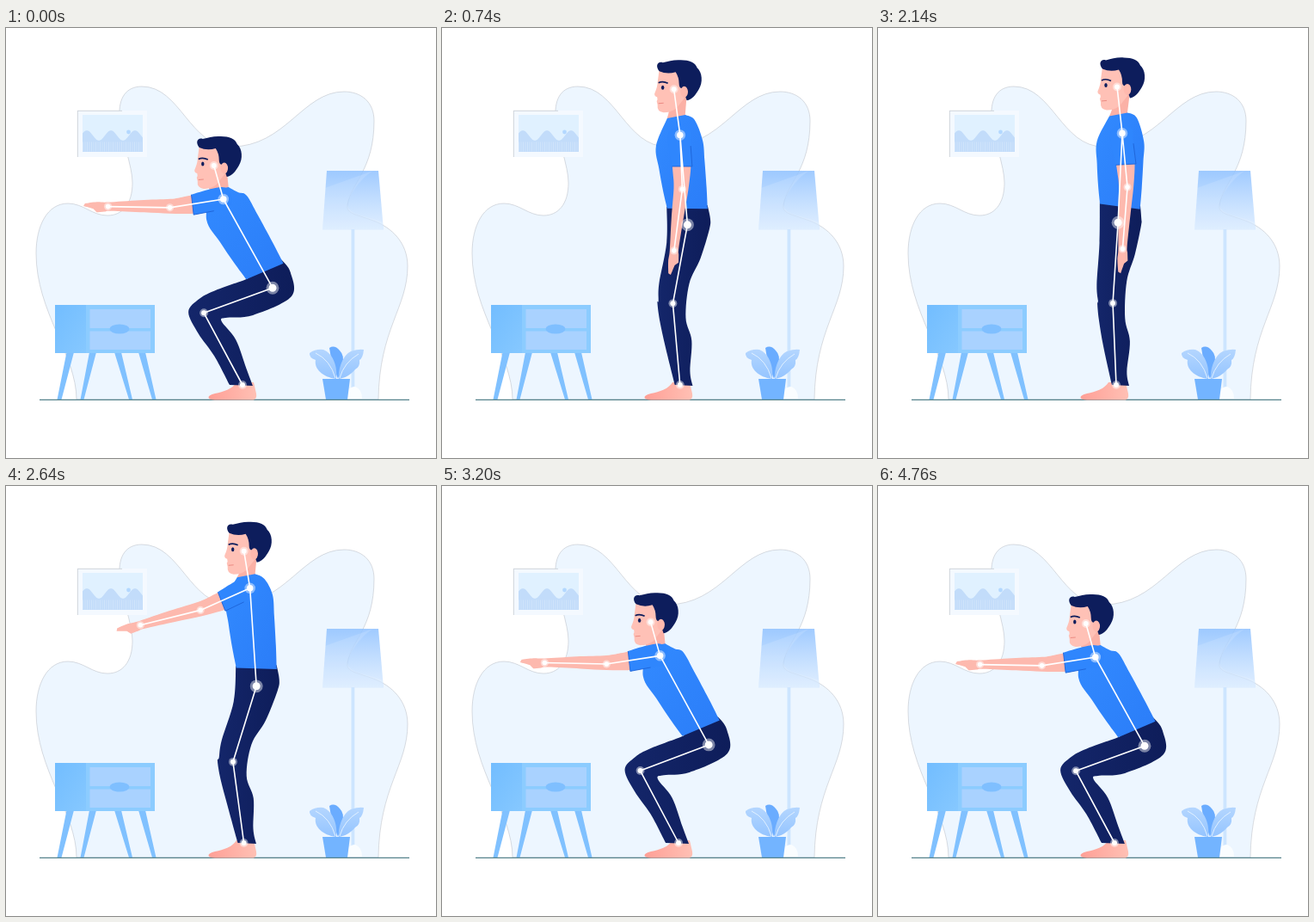
These frames come from a looping animation (500 px wide and 500 px high, 4800 ms). An HTML page:

```html
<!DOCTYPE html>
<html lang="en">
<head>
<meta charset="utf-8">
<title>Squat tracking</title>
<style>
html, body { margin: 0; width: 100%; height: 100%; overflow: hidden; background: #fff; }
svg { display: block; width: 100vw; height: 100vh; }
text { font: 800 16px Inter, "Open Sans", sans-serif; }
</style>
</head>
<body>
<svg viewBox="0 0 500 500">
  <defs>
    <linearGradient id="shade" x2="0" y2="1"><stop stop-color="#8fc1ff" stop-opacity=".85"/><stop offset="1" stop-color="#cfe5ff" stop-opacity=".65"/></linearGradient>
    <linearGradient id="door" x2="1" y2="1"><stop stop-color="#72bdff"/><stop offset="1" stop-color="#86c8ff"/></linearGradient>
    <linearGradient id="leaf" x2="0" y2="1"><stop stop-color="#b4d6ff"/><stop offset="1" stop-color="#94c4ff"/></linearGradient>
    <linearGradient id="cloth" x2="1" y2="1"><stop stop-color="#328aff"/><stop offset="1" stop-color="#2b7df8"/></linearGradient>
    <linearGradient id="navy" x2="1" y2="0"><stop stop-color="#14266a"/><stop offset="1" stop-color="#0e1d5a"/></linearGradient>
    <linearGradient id="toes" x2="1" y2="0"><stop stop-color="#ff9f96"/><stop offset="1" stop-color="#ffc0b4"/></linearGradient>
  </defs>

  <path d="M433 432C434 350 467 325 467 277C467 250 449 232 427 224S396 216 397 206C401 180 428 165 428 108C428 86 413 74 393 74C345 74 325 138 262 138C213 138 203 68 158 68C139 68 131 82 132 102C134 130 147 160 147 180C147 205 135 218 118 218C100 218 90 204 72 204C48 204 35 230 35 262C35 330 82 380 82 432Z" fill="#edf6ff" stroke="#b4b9c0" stroke-width=".5"/>

  <g id="picture">
    <path d="M83 96H164V150H83Z" fill="#f4f9ff"/>
    <path d="M83.3 150V96.3H135" fill="none" stroke="#b4b9c0" stroke-width=".6"/>
    <path d="M89 101H159V144H89Z" fill="#e0f1ff"/>
    <path id="wave" fill="#c2dcfa"/>
    <path d="M89 138H159" stroke="#fff" stroke-opacity=".22" stroke-width="11" stroke-dasharray="1 1.5"/>
    <circle cx="142.5" cy="121" r="2.4" fill="#b3d8ff"/>
  </g>

  <g id="lamp">
    <path d="M401.5 234H405.3V420H401.5Z" fill="#cde5ff"/>
    <path d="M394 431Q396 417 406 417Q414 420 414 431Z" fill="#fafdff"/>
    <path d="M373 166H433L439 234.500H368Z" fill="url(#shade)"/>
    <path d="M427 166C415 172 398 194 397 206C400 219 420 218 438 226V234H368L371 186Z" fill="#fff" fill-opacity=".13"/>
  </g>

  <g id="cabinet">
    <path d="M70.500 377H79L64.500 432H59.500ZM97 377H105L90.500 432H86.500ZM126 377H134L147 432H143ZM154 377H162L174.500 432H170Z" fill="#80c1ff"/>
    <path d="M57 322H173V378H57Z" fill="#8cccff"/>
    <path d="M57 322H93V378H57Z" fill="url(#door)"/>
    <path d="M97.500 327H168V349H97.500ZM97.500 352.500H168V374H97.500Z" fill="#a9d2ff"/>
    <ellipse cx="132" cy="350" rx="11.500" ry="5.500" fill="#7fbfff"/>
  </g>

  <g id="plant">
    <path d="M376 372Q382 368 388 375Q394 381 391 391L386 408Q378 388 376 372Z" fill="#6aacff"/>
    <path d="M384 408C368 406 358 396 360 386Q352 383 353 378Q360 373 369 374C380 378 386 394 384 408Z" fill="url(#leaf)"/>
    <path d="M387 408C386 396 392 380 401 376Q410 373 416 374Q415 384 411 386Q412 394 406 397C400 404 394 407 387 408Z" fill="url(#leaf)"/>
    <path d="M360 378Q377 386 383 407M410 379Q393 389 388 407" fill="none" stroke="#e6f3ff" stroke-width=".9"/>
    <path d="M368 408H400L397 432H372Z" fill="#73b4ff"/>
  </g>

  <path d="M39 432.400H469" stroke="#55828c" stroke-width="1.300"/>

  <g id="person">
    <path d="M268 412C263 420 253 423 243 425Q235 427 235.500 430Q237 432.500 243 432.500H288Q292 431 291 425L288 412Z" fill="url(#toes)"/>
    <path id="neck" fill="#fbb1a6"/>
    <g id="head">
      <path d="M-17 -23L-19 -8Q-19 -3 -22.500 5Q-23 8 -19.500 9Q-18.500 12 -20 14L-19 18Q-20 26 -12 27Q-3 27 3 22L14 8V-22Z" fill="#ffc1b6"/>
      <path d="M-17 -21C-22 -27 -19 -33 -13 -31C-6 -33 0 -34.500 8 -34C18 -34 25 -31 27 -25C33 -20 34 -8 29 0C25 7 21 12 15 13L10 -1Q6 -1 6 -6Q6 -14 2 -20Q-8 -17 -17 -21Z" fill="#0d1d5c"/>
      <ellipse cx="12" cy="3" rx="4.300" ry="6.500" fill="#ffb9ae"/>
      <path d="M-18 -7.500Q-13 -10 -7 -7" fill="none" stroke="#0d1d5c" stroke-width="1.700"/>
      <ellipse cx="-13" cy="-2" rx="1.700" ry="2.500" fill="#0d1d5c"/>
      <path d="M-18 16.500L-12 16" stroke="#ec8b83" stroke-width="1"/>
    </g>
    <path id="pants" fill="url(#navy)"/>
    <path id="torso" fill="url(#cloth)"/>
    <path id="arm" fill="#fdb9ae"/>
    <path id="sleeve" fill="#2f86fd"/>
    <path id="seam" fill="none" stroke="#1d63d6" stroke-width=".9"/>
    <path id="bones" fill="none" stroke="#fff" stroke-width="1.600" stroke-linejoin="round"/>
    <g id="joints" fill="#fff"></g>
  </g>

  <g id="angle">
    <path id="arc" d="M276 316C281 337 272 358 250.500 366.500" pathLength="1" stroke-dasharray="1 2" fill="none" stroke="#0cc81c" stroke-width="2.300"/>
    <text id="degrees" y="357" fill="#0cc81c">85°</text>
  </g>
</svg>

<script>
const LOOP = 4800;
const $ = id => document.getElementById(id);
const clamp = x => Math.max(0, Math.min(1, x));
const ease = x => x * x * (3 - 2 * x);
const mix = (a, b, k) => a + (b - a) * k;
const ramp = (t, from, to) => ease(clamp((t - from) / (to - from)));
const pt = p => p[0].toFixed(2) + ' ' + p[1].toFixed(2);

// Smooth curve through a run of points
const smooth = p => p.slice(1).map((b, i) => {
  const a = p[i], z = p[i - 1] || a, c = p[i + 2] || b;
  const c1 = [a[0] + (b[0] - z[0]) / 6, a[1] + (b[1] - z[1]) / 6];
  const c2 = [b[0] - (c[0] - a[0]) / 6, b[1] - (c[1] - a[1]) / 6];
  return `C${pt(c1)} ${pt(c2)} ${pt(b)}`;
}).join('');
const outline = (...runs) =>
  runs.map((r, i) => (i ? 'L' : 'M') + pt(r[0]) + smooth(r)).join('') + 'Z';
const line = (...p) => 'M' + p.map(pt).join('L');
const draw = (id, d) => $(id).setAttribute('d', d);

const crests = Array.from({ length: 36 }, (_, i) =>
  [89 + 2 * i, 125 - 6 * Math.cos((2 * i - 33) * Math.PI / 14)]);
draw('wave', line(...crests, [159, 144], [89, 144]) + 'Z');

// Point at a distance; 0 degrees is up, positive turns right
const reach = (p, deg, len) => {
  const r = deg * Math.PI / 180;
  return [p[0] + Math.sin(r) * len, p[1] - Math.cos(r) * len];
};

// Local axes of a bone: u along it, n towards the front
function bone(a, b) {
  const dx = b[0] - a[0], dy = b[1] - a[1], len = Math.hypot(dx, dy);
  const ux = dx / len, uy = dy / len;
  const at = (u, n) => [a[0] + ux * u - uy * n, a[1] + uy * u + ux * n];
  at.len = len;
  return at;
}

// 1 in the squat, 0 standing
const squat = (t, up, stood, down, low) => 1 - ramp(t, up, stood) + ramp(t, down, low);

function pose(t) {
  const bend = squat(t, 0, 925, 2390, 3255);
  const lean = squat(t, 0, 1080, 2390, 3255);
  const lift = squat(t, 250, 815, 2180, 2880);
  const sway = Math.sin(Math.PI * clamp((t - 1080) / 1100)) ** 2;
  const swing = 174.5 + 102.5 * lift - 16 * bend - sway;

  const ankle = [277 - 2 * bend, 415];
  const knee = reach(ankle, -mix(2.4, 28.2, bend), 95);
  const hip = reach(knee, mix(3.7, 70, bend), 94 - 9 * bend);
  const shoulder = reach(hip, mix(2.7, -29, lean), 104 + 14 * lift);
  const head = [shoulder[0] - 6 - 5 * lean, shoulder[1] - 54 + 15 * lift];
  const elbow = reach(shoulder, swing, 63);
  const wrist = reach(elbow, swing + 10, 72);
  return { bend, lift, head, shoulder, hip, knee, ankle, elbow, wrist };
}

const dots = [3, 3.8, 4.5, 3, 3, 2.8, 2.8].map(r => {
  const g = document.createElementNS('http://www.w3.org/2000/svg', 'g');
  g.innerHTML = `<circle r="${r * 1.65}" fill-opacity=".45"/><circle r="${r}"/>`;
  return $('joints').appendChild(g);
});

function drawPerson(t) {
  const { bend, lift, head, shoulder, hip, knee, ankle, elbow, wrist } = pose(t);
  const spine = bone(shoulder, hip), thigh = bone(hip, knee), shin = bone(knee, ankle);
  const upper = bone(shoulder, elbow), fore = bone(elbow, wrist);
  const near = (p, x, y) => [p[0] + x, p[1] + y];

  // Torso sides as a function of the fraction along the spine
  const belly = s => spine(s * spine.len, 29 - 11 * s * s);
  const back = s => spine(s * spine.len, -26 + 5 * (s - .35) ** 2);
  const rise = 20 - 10 * lift;
  const collar = [near(shoulder, -15, -rise), near(shoulder, 6, -rise - 4)];

  draw('torso', outline(
    [...[.8, .6, .35, .1].map(belly), collar[0]],
    [collar[1], near(shoulder, 17, 2 - rise), ...[.08, .3, .6, .84].map(back)]));
  draw('neck', outline([near(head, -7, 20), near(head, -6, 26), collar[0]],
    [spine(5, 6), spine(5, -8)], [collar[1], near(head, 15, 6)]));
  $('head').setAttribute('transform', `translate(${head})`);

  draw('pants', outline(
    [belly(.78), thigh(25, 20), thigh(thigh.len - 20, 20), thigh(thigh.len, 17),
      near(knee, -18, -1), shin(18, 17), shin(50, 13), [272 - 12 * bend, 415]],
    [[292 - 5 * bend, 416], shin(80, -13), shin(45, -18), shin(18, -13.5),
      thigh(thigh.len * .72, -14.5), thigh(thigh.len * .38, -22),
      thigh(2 - 19 * bend, -27 + 10 * bend), spine(spine.len * .95, -27), back(.8)]));

  draw('arm', outline(
    [upper(26, 11), upper(45, 10), fore(0, 10), fore(35, 8), fore(72, 5),
      fore(85, 5), fore(99, 3)],
    [fore(100.5, 0), fore(89, -3)],
    [fore(85, -7), fore(76, -6), fore(68, -5), fore(30, -6), fore(0, -7),
      upper(42, -10.5), upper(26, -12)]));
  draw('sleeve', outline(
    [upper(36, 11), upper(13, 14), upper(-4, 13), upper(-10, 0), upper(-4, -12),
      upper(9, -12), upper(37, -12.5)]));
  draw('seam', line(upper(13, -11.8), upper(37, -12.5), upper(36, 11)));

  draw('bones', line(head, shoulder, hip, knee, ankle) + line(shoulder, elbow, wrist));
  [head, shoulder, hip, knee, ankle, elbow, wrist].forEach((p, i) =>
    dots[i].setAttribute('transform', `translate(${p})`));
}

function drawAngle(t) {
  const leave = ramp(t, 4400, 4760);
  const sweep = ramp(t, 3280, 3740) * (1 - leave);
  const label = ramp(t, 3400, 3740) * (1 - leave);
  $('angle').setAttribute('visibility', sweep > .001 ? 'visible' : 'hidden');
  $('arc').setAttribute('stroke-dashoffset', 1 - sweep);
  $('degrees').setAttribute('x', 281 + 13 * (1 - label));
  $('degrees').setAttribute('opacity', label);
}

const start = performance.now();
function tick() {
  const t = (performance.now() - start) % LOOP;
  drawPerson(t);
  drawAngle(t);
  requestAnimationFrame(tick);
}
tick();
</script>
</body>
</html>
```
